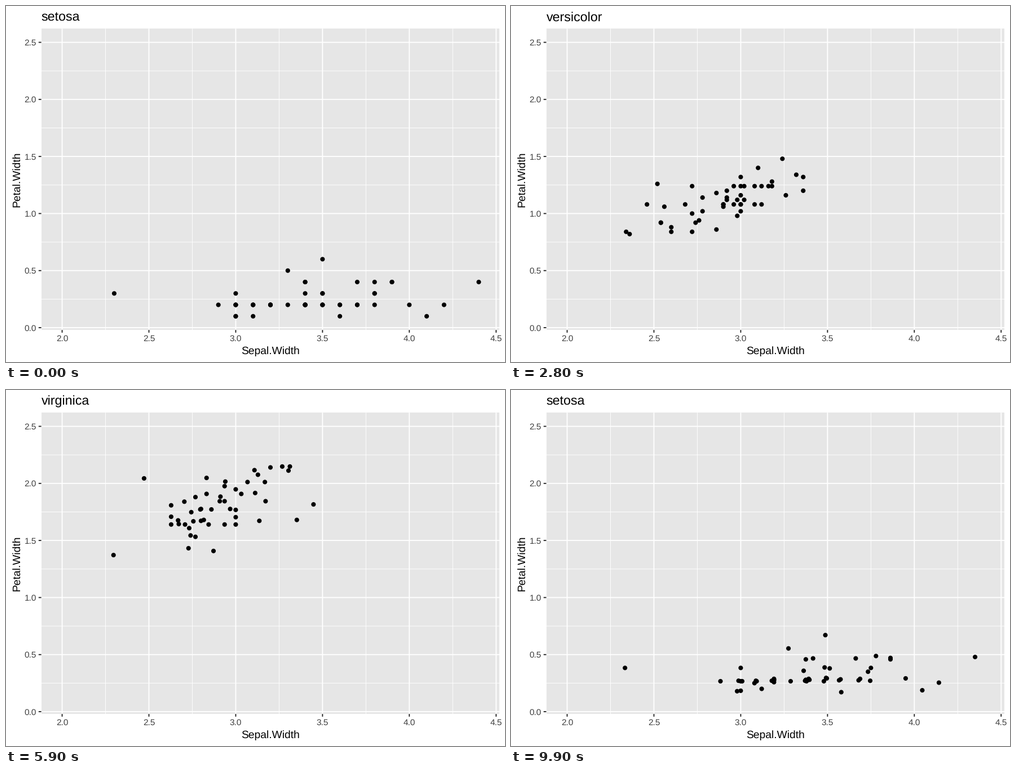
A matplotlib script for the animation above (10000 ms loop, 885 by 632 pixels).

```python
import numpy as np
import matplotlib.pyplot as plt
from matplotlib.animation import FuncAnimation
from matplotlib.patches import Rectangle

plt.rcParams.update({"font.family": "Liberation Sans", "text.hinting": "none"})

W, H, DPI = 885, 632, 100
LEFT, RIGHT, TOP, BOTTOM = 62.6, 875.4, 40.2, 575.1
X_MIN, Y_MIN, SPAN = 1.88, -0.02, 2.64
PANEL, LABEL, TICK = "#e6e6e6", "#3f3f3f", "#262626"

# Flower measurements in tenths, one row order per species
SETOSA_SEPAL = [
    35, 30, 32, 31, 36, 39, 34, 34, 29, 31, 37, 34, 30, 30, 40, 44, 39,
    35, 38, 38, 34, 37, 36, 33, 34, 30, 34, 35, 34, 32, 31, 34, 41, 42,
    31, 32, 35, 36, 30, 34, 35, 23, 32, 35, 38, 30, 38, 32, 37, 33]
VERSICOLOR_SEPAL = [
    32, 32, 31, 23, 28, 28, 33, 24, 29, 27, 20, 30, 22, 29, 29, 31, 30,
    27, 22, 25, 32, 28, 25, 28, 29, 30, 28, 30, 29, 26, 24, 24, 27, 27,
    30, 34, 31, 23, 30, 25, 26, 30, 26, 23, 27, 30, 29, 29, 25, 28]
VIRGINICA_SEPAL = [
    33, 27, 30, 29, 30, 30, 25, 29, 25, 36, 32, 27, 30, 25, 28, 32, 30,
    38, 26, 22, 32, 28, 28, 27, 33, 32, 28, 30, 28, 30, 28, 38, 28, 28,
    26, 30, 34, 31, 30, 31, 31, 31, 27, 32, 33, 30, 25, 30, 34, 30]
VERSICOLOR_PETAL = [
    14, 15, 15, 13, 15, 13, 16, 10, 13, 14, 10, 15, 10, 14, 13, 14, 15,
    10, 15, 11, 18, 13, 15, 12, 13, 14, 14, 17, 15, 10, 11, 10, 12, 16,
    15, 16, 15, 13, 13, 13, 12, 14, 12, 10, 13, 12, 13, 13, 11, 13]
VIRGINICA_PETAL = [
    25, 19, 21, 18, 22, 21, 17, 18, 18, 25, 20, 19, 21, 20, 24, 23, 18,
    22, 23, 15, 23, 20, 20, 18, 21, 18, 18, 18, 21, 16, 19, 20, 22, 15,
    14, 23, 24, 18, 18, 21, 24, 23, 19, 23, 25, 23, 19, 20, 23, 18]

# Most setosa petals are 0.2 wide; only the others are listed, by row
SETOSA_PETAL = np.full(50, 2)
for width, rows in {1: [9, 12, 13, 32, 37], 3: [6, 17, 18, 19, 40, 41, 45],
                    4: [5, 15, 16, 21, 26, 31, 44], 5: [23], 6: [43]}.items():
    SETOSA_PETAL[rows] = width


def px(x):
    return LEFT + (x - X_MIN) / SPAN * (RIGHT - LEFT)


def py(y):
    return BOTTOM - (y - Y_MIN) / SPAN * (BOTTOM - TOP)


def state(sepal, petal):
    return np.column_stack([px(np.array(sepal) / 10), py(np.array(petal) / 10)])


NAMES = ["setosa", "versicolor", "virginica"]
STATES = [state(SETOSA_SEPAL, SETOSA_PETAL),
          state(VERSICOLOR_SEPAL, VERSICOLOR_PETAL),
          state(VIRGINICA_SEPAL, VIRGINICA_PETAL)]
MOVES = [(8, 25), (42, 25), (76, 24)]  # last resting frame, length of move

fig = plt.figure(figsize=(W / DPI, H / DPI), dpi=DPI, facecolor="white")
ax = fig.add_axes([0, 0, 1, 1])
ax.set_xlim(0, W)
ax.set_ylim(H, 0)
ax.axis("off")


def line(xs, ys, width, color, z):
    ax.plot(xs, ys, color=color, lw=width * 72 / DPI, zorder=z,
            solid_capstyle="butt", snap=False)


def text(x, y, s, size, color="black", **kw):
    return ax.text(x, y, s, fontsize=size * 72 / DPI, color=color, **kw)


ax.add_patch(Rectangle((LEFT, TOP), RIGHT - LEFT, BOTTOM - TOP,
                       fc=PANEL, lw=0, zorder=0))
for v in np.arange(2.25, 4.5, 0.5):
    line([px(v)] * 2, [TOP, BOTTOM], 0.94, "white", 1)
for v in np.arange(0.25, 2.5, 0.5):
    line([LEFT, RIGHT], [py(v)] * 2, 0.94, "white", 1)
for v in np.arange(2, 4.6, 0.5):
    line([px(v)] * 2, [TOP, BOTTOM], 1.87, "white", 2)
    line([px(v)] * 2, [BOTTOM, BOTTOM + 4.8], 1.87, TICK, 2)
    text(px(v), 595.2, f"{v:.1f}", 15.45, LABEL, ha="center", va="baseline")
for v in np.arange(0, 2.6, 0.5):
    line([LEFT, RIGHT], [py(v)] * 2, 1.87, "white", 2)
    line([LEFT - 4.8, LEFT], [py(v)] * 2, 1.87, TICK, 2)
    text(54, py(v) + 5.5, f"{v:.1f}", 15.45, LABEL, ha="right", va="baseline")

text((LEFT + RIGHT) / 2, 618, "Sepal.Width", 19.3, ha="center", va="baseline")
text(24, (TOP + BOTTOM) / 2, "Petal.Width", 19.3, rotation=90,
     rotation_mode="anchor", ha="center", va="baseline")
title = text(LEFT, 26.5, NAMES[0], 23.2, va="baseline")
dots = ax.scatter(*STATES[0].T, s=np.full(50, (8.1 * 72 / DPI) ** 2),
                  c="black", lw=0, zorder=3, snap=False)


def draw(frame):
    here, part = 0, 0.0
    for i, (start, length) in enumerate(MOVES):
        if frame > start:
            here, part = i, min((frame - start) / length, 1)
    after = (here + 1) % 3
    dots.set_offsets(STATES[here] * (1 - part) + STATES[after] * part)
    title.set_text(NAMES[after if part >= 0.5 else here])
    return dots, title


anim = FuncAnimation(fig, draw, frames=100, interval=100, repeat=True,
                     repeat_delay=0, blit=False)
plt.show()
```
